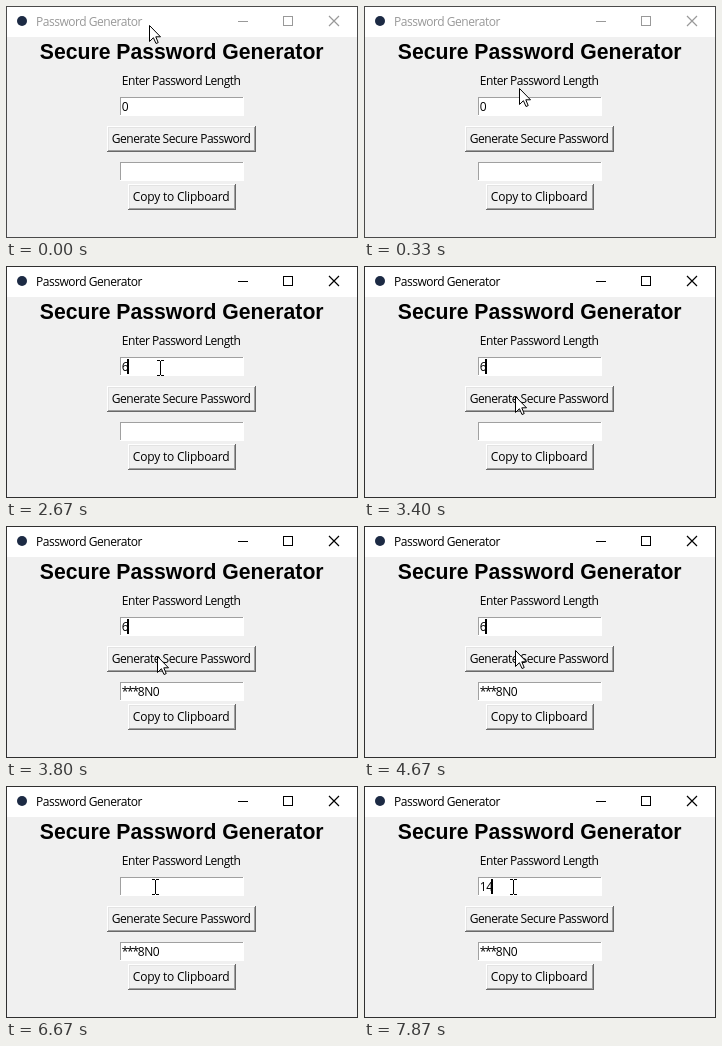
Recreate the animation shown at these times as an HTML page. Size 352 px wide and 232 px high, loop 8 s.

```html
<!DOCTYPE html>
<html lang="en">
<head>
<meta charset="utf-8">
<title>Password Generator</title>
<style>
  html, body { margin: 0; width: 100%; height: 100%; overflow: hidden; background: #f0f0f0; }
  svg { display: block; width: 352px; height: 232px; }
  text { font: 12px "Open Sans", "Noto Sans", sans-serif; letter-spacing: -.47px; white-space: pre; }
  .heading { font: bold 21.2px "Liberation Sans", Arial, sans-serif; letter-spacing: 0; }
  .loose { letter-spacing: -.2px; }
  .stars { letter-spacing: -1.3px; }
  .crisp { shape-rendering: crispEdges; }
</style>
</head>
<body>
<svg viewBox="0 0 352 232" xmlns="http://www.w3.org/2000/svg">
  <rect width="352" height="232" fill="#f0f0f0"/>
  <rect width="352" height="31" fill="#fff"/>
  <circle cx="16" cy="15" r="5" fill="#1c2a44"/>
  <g id="chrome">
    <text x="30" y="20">Password Generator</text>
    <g fill="none" stroke="currentColor">
      <path class="crisp" d="M232 15.5h10M277.5 10.5h9v9h-9z"/>
      <path d="M323 10l10 10M333 10l-10 10" stroke-width="1.2"/>
    </g>
  </g>

  <text class="heading" x="33.8" y="53">Secure Password Generator</text>
  <text x="115.8" y="79">Enter Password Length</text>

  <g id="fields" class="crisp"></g>
  <text id="length" x="115.8" y="105"></text>
  <rect id="caret" class="crisp" y="93" width="2" height="15"/>
  <text id="result" x="115.8" y="170"><tspan class="stars">***</tspan>8N0</text>

  <g id="buttons" class="crisp"></g>
  <text id="generate" x="105.8" y="137">Generate Secure Password</text>
  <text class="loose" x="126.8" y="195">Copy to Clipboard</text>

  <rect id="border" class="crisp" x=".5" y=".5" width="351" height="231" fill="none"/>

  <path id="arrow" d="M.5 .5V16.5L4.4 12.7L7 18.5L9.2 17.6L6.8 11.8H11.5Z" fill="#fff" stroke="#000"/>
  <path id="beam" class="crisp" d="M-3 -7.5h3M1 -7.5h3M.5 -7V7M-3 7.5h3M1 7.5h3" fill="none" stroke="#000"/>
</svg>
<script>
// Time is counted in ticks of 1/15 s.
const LOOP = 8000, FPS = 15;
const CLICK = 10, PRESS = 56, RELEASE = 57;
const $ = id => document.getElementById(id);

// Pointer strokes: a curve with one control point, slowing to a stop.
const home = [143, 19];
const moves = [
  { from: 0, to: 11, bend: [161, 72], end: [152, 102] },
  { from: 13, to: 16, bend: [148, 100], end: [143, 99] },
  { from: 39, to: 47, bend: [173, 102], end: [151, 130] },
  { from: 69, to: 78, bend: [151, 115], end: [149, 101] }
];

// "<" is the backspace key.
const keys = [[24, "<"], [32, "6"], [100, "<"], [115, "1"], [118, "4"]];

const easeOut = u => 1 - (1 - u) ** 2;

function pointerAt(tick) {
  let pos = home;
  for (const { from, to, bend, end } of moves) {
    if (tick < from) break;
    const s = easeOut(Math.min(1, (tick - from) / (to - from)));
    pos = pos.map((p, i) =>
      Math.round((1 - s) ** 2 * p + 2 * s * (1 - s) * bend[i] + s * s * end[i]));
  }
  return pos;
}

function typedAt(tick) {
  return keys.filter(([when]) => when <= tick)
    .reduce((text, [, key]) => key === "<" ? text.slice(0, -1) : text + key, "0");
}

// One pixel frame: upper-left and lower-right edges in two colours.
function bevel(x, y, w, h, light, dark) {
  return `<path d="M${x + .5} ${y + h - 1}V${y + .5}H${x + w - 1}" fill="none" stroke="${light}"/>
    <path d="M${x} ${y + h - .5}H${x + w - .5}V${y}" fill="none" stroke="${dark}"/>`;
}

function field(x, y, w, h) {
  return `<rect x="${x}" y="${y}" width="${w}" height="${h}" fill="#fff"/>` +
    bevel(x, y, w, h, "#a0a0a0", "#fff");
}

function button(x, y, w, h, down) {
  const outer = down ? ["#696969", "#fff"] : ["#fff", "#696969"];
  const inner = down ? ["#a0a0a0", "#e3e3e3"] : ["#e3e3e3", "#a0a0a0"];
  return bevel(x, y, w, h, ...outer) + bevel(x + 1, y + 1, w - 2, h - 2, ...inner);
}

const show = (el, on) => el.setAttribute("visibility", on ? "visible" : "hidden");

function draw(tick) {
  const active = tick >= CLICK;
  const tone = active ? "#000" : "#999";
  $("chrome").setAttribute("fill", tone);
  $("chrome").setAttribute("color", tone);
  $("border").setAttribute("stroke", active ? "#303030" : "#4a4a4a");

  const value = typedAt(tick);
  $("length").textContent = value;
  $("caret").setAttribute("x", 115 + 6 * value.length);
  const blink = (tick * 1000 / FPS - 665) % 900;
  show($("caret"), active && blink < 600);

  const down = tick >= PRESS && tick < RELEASE;
  $("buttons").innerHTML = button(101, 120, 149, 26, down) + button(122, 178, 108, 26, false);
  $("generate").setAttribute("transform", down ? "translate(1 1)" : "");
  show($("result"), tick >= RELEASE);

  const [x, y] = pointerAt(tick);
  const inField = x >= 114 && x < 238 && y >= 91 && y < 110;
  for (const id of ["arrow", "beam"]) $(id).setAttribute("transform", `translate(${x} ${y})`);
  show($("arrow"), !inField);
  show($("beam"), inField);
}

$("fields").innerHTML = field(114, 91, 124, 19) + field(114, 156, 124, 19);

const start = performance.now();
let last = -1;
function loop() {
  const time = (performance.now() - start) % LOOP;
  // The small lead lets times rounded to 10 ms fall on their tick.
  const tick = Math.floor((time + 5) * FPS / 1000);
  if (tick !== last) draw(last = tick);
  requestAnimationFrame(loop);
}
loop();
</script>
</body>
</html>
```
